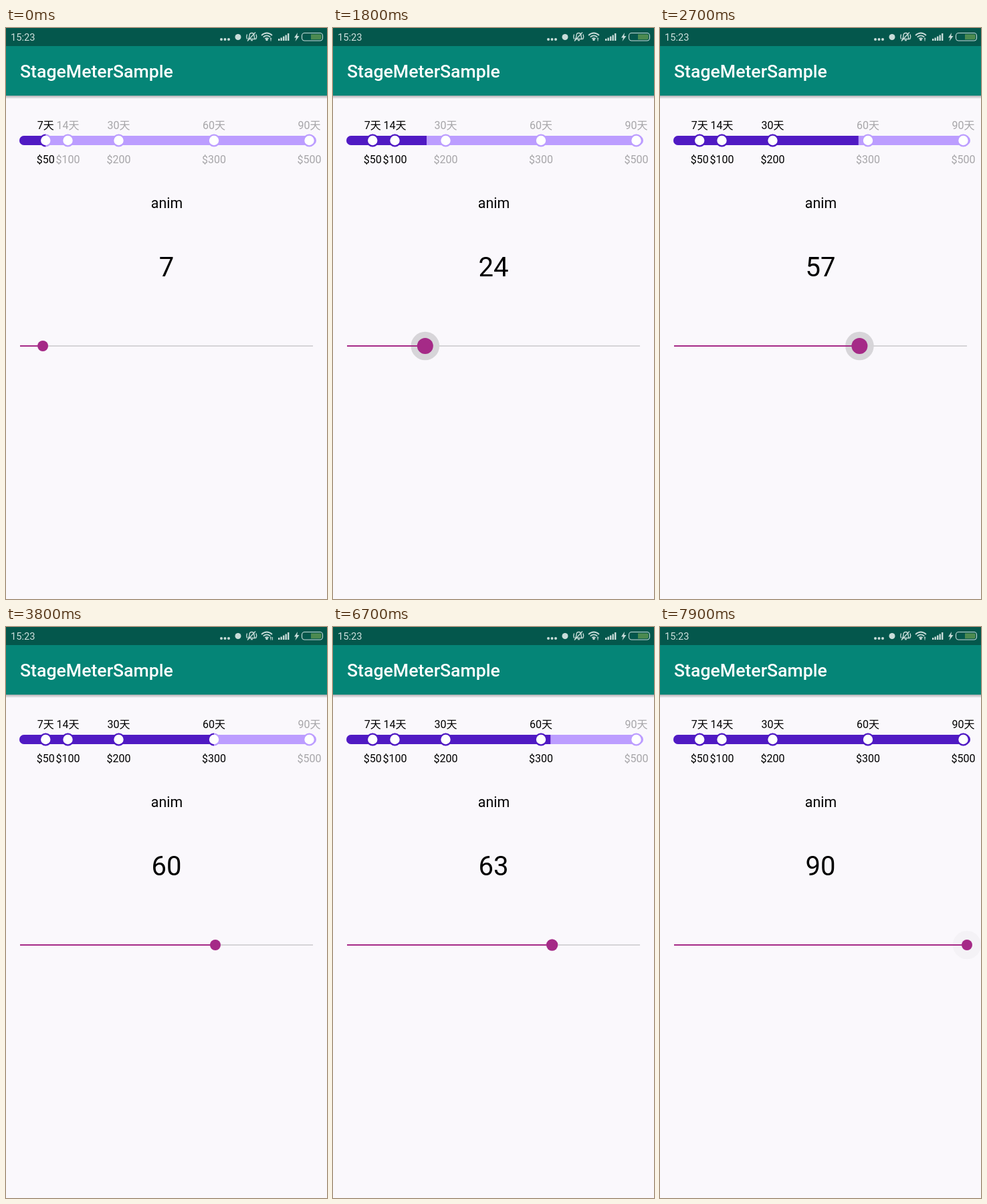
Write an HTML page that moves like this. It is 480 by 853 pixels and loops after 8000 ms.

```html
<!DOCTYPE html>
<html lang="en">
<head>
<meta charset="utf-8">
<title>Progress with labels</title>
<style>
  html, body { margin: 0; width: 100%; height: 100%; overflow: hidden; background: #faf8fc; }
  svg { display: block; width: 480px; height: 853px; font-family: Roboto, "Noto Sans CJK SC", "Noto Sans CJK", sans-serif; }
  .mid { text-anchor: middle; }
  .label { font-size: 16px; fill: #a7a6a9; }
  .label.on { fill: #000; }
  .icon { fill: none; stroke: #c9dcd9; stroke-width: 1.4; }
  .solid { fill: #c9dcd9; }
</style>
</head>
<body>
<svg viewBox="0 0 480 853">
  <defs>
    <linearGradient id="shade" x2="0" y2="1">
      <stop offset="0" stop-opacity=".3"/>
      <stop offset="1" stop-opacity="0"/>
    </linearGradient>
    <clipPath id="done"><rect id="fill" y="150" height="36"/></clipPath>
    <clipPath id="row"><rect y="235" width="480" height="53"/></clipPath>
  </defs>

  <rect width="480" height="853" fill="#faf8fc"/>
  <rect y="101" width="480" height="5" fill="url(#shade)"/>
  <rect y="27" width="480" height="74" fill="#058577"/>
  <rect width="480" height="27" fill="#04574c"/>

  <text x="7" y="19" font-size="14.67" fill="#cfe0dd">15:23</text>
  <g class="solid">
    <circle cx="322" cy="17" r="2"/><circle cx="327.5" cy="17" r="2"/><circle cx="333" cy="17" r="2"/>
    <circle cx="347" cy="13.5" r="4.5"/>
    <path d="M407 16h2.4v3h-2.4zM410.5 14.5h2.4v4.5h-2.4zM414 12.500h2.4v6.500h-2.400zM417.500 10.500h2.400v8.500h-2.400zM421 8h2.400v11h-2.400z"/>
    <path d="M436 7l-5 7.500h3l-1.500 5.500 6-8h-3.200z"/>
    <circle cx="390" cy="17.500" r="1.800"/>
  </g>
  <g class="icon">
    <path d="M362.500 16.500q1.500-2 1.500-5q0-4 3.500-4t3.500 4q0 3 1.500 5zM366 18.500h3M361 19.500L373 6.500M360.500 9.500q-1.500 3.500 0 7M374 9.500q1.500 3.500 0 7"/>
    <path d="M382 11q8-7 16 0M384.700 13.700q5.300-4.500 10.600 0M387.300 16q2.700-2 5.400 0" stroke-width="1.700"/>
    <path d="M396 14.500v5M394.700 16h2.600" stroke-width="1"/>
    <path id="net" d="M398.500 15v4.500" stroke-width="1"/>
    <rect x="442.500" y="7.500" width="31" height="11.500" rx="4" stroke-width="1.100"/>
  </g>
  <path d="M456 9.300h13.500q2.200 0 2.200 2.200v3.500q0 2.200-2.200 2.200H456z" fill="#4c8a50"/>

  <text x="21" y="74" font-size="26.67" font-weight="500" fill="#fff">StageMeterSample</text>

  <g id="light" fill="#bc9dff" stroke="#bc9dff"></g>
  <g id="dark" fill="#501ac3" stroke="#501ac3" clip-path="url(#done)"></g>
  <g id="nodes" fill="#fff"></g>
  <g id="labels"></g>

  <g clip-path="url(#row)"><circle id="ripple" cx="240" cy="262"/></g>
  <text class="mid" x="240.500" y="269" font-size="21.33">anim</text>
  <text class="mid" id="count" x="240" y="371" font-size="40"></text>

  <circle id="halo" cy="475"/>
  <rect x="21" y="474" width="438" height="2" fill="#d5d4d7"/>
  <rect id="track" x="21" y="474" height="2" fill="#a52a87"/>
  <circle id="thumb" cy="475" fill="#a52a87"/>
</svg>
<script>
const LOOP = 8000, STEP = 100;
const stops = [[7, 50], [14, 100], [30, 200], [60, 300], [90, 500]];
// [ms, days] while the slider is dragged
const drag = [[1000, 7], [1100, 10], [1400, 14], [1800, 24], [2200, 41], [2500, 52], [2700, 57], [3000, 60],
              [6600, 60], [6700, 63], [6900, 72], [7200, 87], [7400, 90]];
const touches = [[975, 3150], [6675, 7650]];

const $ = id => document.getElementById(id);
const set = (id, attrs) => { for (const k in attrs) $(id).setAttribute(k, attrs[k]); };
const ramp = (t, from, length) => Math.min(1, Math.max(0, (t - from) / length));
const barX = days => 26 + 4.75 * days;

const bar = '<rect x="20" y="161" width="444" height="14" rx="7" stroke="none"/>' +
  stops.map(([d]) => `<circle cx="${barX(d)}" cy="168" r="9.5" stroke="none"/>`).join('');
$('light').innerHTML = $('dark').innerHTML = bar;
$('nodes').innerHTML = stops.map(([d]) => `<circle cx="${barX(d)}" cy="168" r="7.2"/>`).join('');
$('labels').innerHTML = stops.map(([d, price]) =>
  `<g class="label mid"><text x="${barX(d)}" y="151">${d}天</text><text x="${barX(d)}" y="201.5">$${price}</text></g>`).join('');
const labels = [...$('labels').children];

function dragged(t) {
  let days = drag[0][1];
  for (let i = 1; i < drag.length; i++) {
    const [t0, a] = drag[i - 1], [t1, b] = drag[i];
    if (t >= t0) days = a + (b - a) * ramp(t, t0, t1 - t0);
  }
  return Math.round(days);
}

function draw(t) {
  const days = dragged(t);
  const playing = t >= 4600 && t < 5610;
  const shown = playing ? days * (1 - Math.cos(Math.PI * ramp(t, 4610, 1000))) / 2 : days;

  set('fill', { width: shown >= 90 ? 480 : barX(shown) });
  labels.forEach((g, i) => g.classList.toggle('on', shown >= stops[i][0]));
  $('count').textContent = days;

  const x = 21 + days / 90 * 438;
  let grow = 0, glow = 0, spread = 0;
  for (const [down, up] of touches) {
    if (t < down) continue;
    grow = ramp(t, down, 150) * (1 - ramp(t, up, 150));
    spread = ramp(t, down + 50, 150);
    glow = spread * (1 - ramp(t, up, 300));
  }
  set('track', { width: x - 21 });
  set('thumb', { cx: x, r: 8 + 4 * grow });
  set('halo', { cx: x, r: 12 + 9.3 * spread, 'fill-opacity': 0.14 * glow });

  const press = t < 4600 ? 0 : 0.1 * (1 - ramp(t, 4750, 430));
  set('ripple', { r: 60 + 190 * ramp(t, 4600, 250), 'fill-opacity': press });
  set('net', { opacity: t >= 3600 && t < 4600 ? 1 : 0 });
}

const start = performance.now();
function frame() {
  const t = (performance.now() - start) % LOOP;
  draw(Math.floor(t / STEP) * STEP);
  requestAnimationFrame(frame);
}
frame();
</script>
</body>
</html>
```
